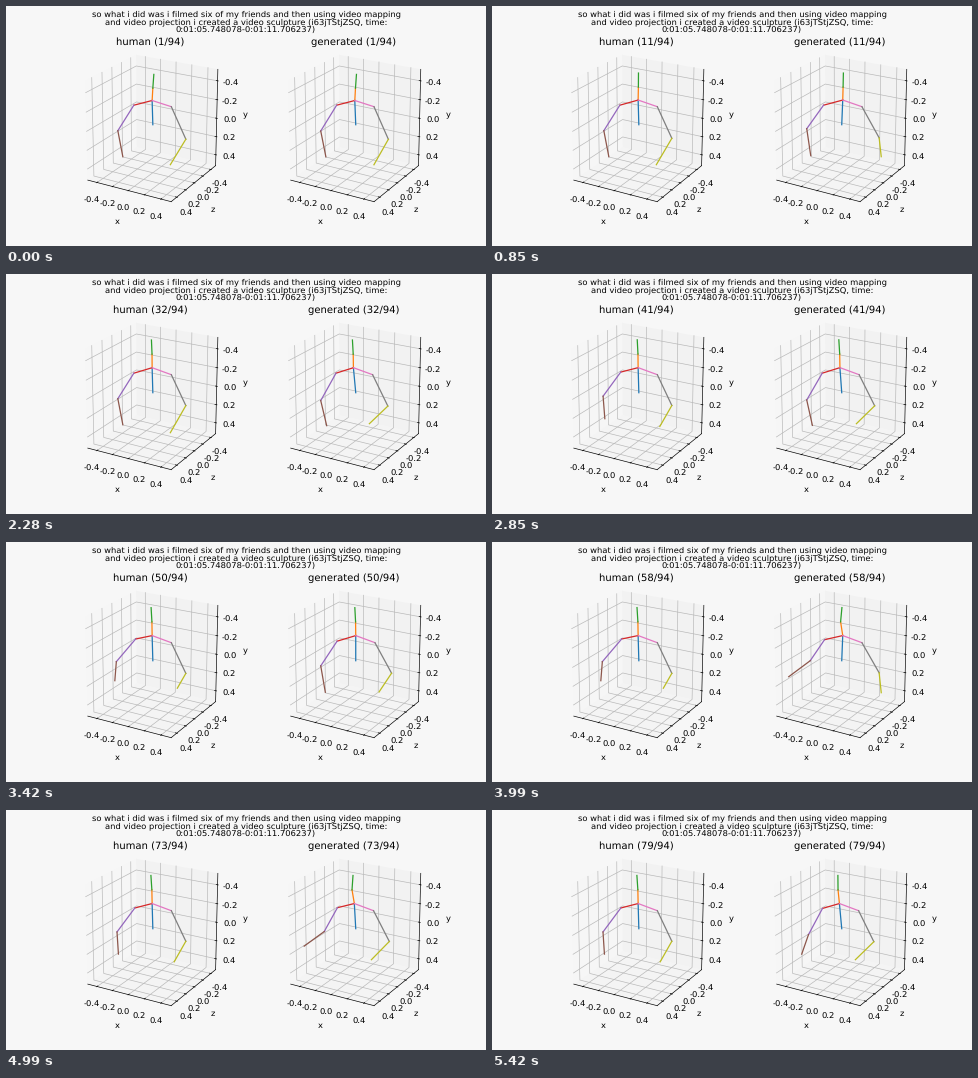
A matplotlib script that plays this animation: 480 px wide and 240 px high, repeating every 5.57 s.

```python
import numpy as np
import matplotlib.pyplot as plt
from matplotlib.animation import FuncAnimation

W, H, DPI = 480, 240, 60
STEPS, LOOP = 39, 5570
SUB = 6  # ticks per step
BACK = "#f7f7f7"

# Two side-by-side plot areas, in pixels from the top left
AX_W = 0.775 / 2.2 * W
AX_H = 0.77 * H
AX_BOTTOM = 0.89 * H
LEFTS = [0.125 * W, 0.125 * W + 1.2 * AX_W]

ELEV, AZIM, DIST = np.radians(20), np.radians(60), 10
EDGE = 0.5 + 1 / 48
TICK_PAD, LABEL_PAD = 0.1083, 0.2355
TICKS = [k / 5 for k in range(-2, 3)]

CAPTION = (
    "so what i did was i filmed six of my friends and then using video mapping\n"
    "and video projection i created a video sculpture (i63jTStjZSQ, time:\n"
    "0:01:05.748078-0:01:11.706237)"
)

# Resting joints, in pixels from the hip
REST = {
    "hip": (0, 0), "neck": (-0.7, -24.2), "chin": (0, -36.5), "head": (1, -50.3),
    "l_shoulder": (-19, -19.5), "l_elbow": (-35, 6), "l_wrist": (-30, 32),
    "r_shoulder": (18.5, -18), "r_elbow": (33, 14.5), "r_wrist": (17.5, 40),
}
CHAINS = [
    ["hip", "neck", "chin", "head"],
    ["neck", "l_shoulder", "l_elbow", "l_wrist"],
    ["neck", "r_shoulder", "r_elbow", "r_wrist"],
]
BONES = [pair for chain in CHAINS for pair in zip(chain, chain[1:])]


def ease(s, a, b):
    u = np.clip((s - a) / (b - a), 0, 1)
    return u * u * (3 - 2 * u)


def bump(s, mid, width):
    return np.exp(-((s - mid) / width) ** 2 / 2)


def grow(s):
    return 1 - np.exp(-s / 10)


def lift(s):
    return ease(s, 16, 24) - 0.45 * ease(s, 28, 35)


def sway(s):
    return np.cos(2 * np.pi * (s - 6) / 22)


def fling(s):
    return ease(s, 24, 28) - ease(s, 35, 41)


def spread(s):
    return bump(s, 6, 2.5) + bump(s, 28, 2.5)


def settle(s):
    return ease(s, 0, 6)


# Each gesture shifts a few joints by its current amount
STRETCH = (grow, {"neck": (0, -1), "chin": (-1, -2.5), "head": (-3, -3),
                  "r_elbow": (0, -2)})
HUMAN = [
    STRETCH,
    (lift, {"l_shoulder": (1.8, -2.2), "l_elbow": (-1.5, -5),
            "l_wrist": (-8, -12), "r_wrist": (7, -12.5)}),
]
GENERATED = [
    STRETCH,
    (sway, {"neck": (1.7, 0), "chin": (1.8, 0), "head": (2, 0),
            "l_shoulder": (0.8, 0), "l_elbow": (0, -2), "l_wrist": (-1, -1),
            "r_shoulder": (1.7, 0), "r_elbow": (2.7, -0.5), "r_wrist": (3, 0)}),
    (fling, {"chin": (-2, 0), "l_shoulder": (1, -1.5), "l_elbow": (3.5, -4),
             "l_wrist": (-22, -15)}),
    (spread, {"r_wrist": (20, 1)}),
    (settle, {"r_elbow": (1.7, 0), "r_wrist": (-1, -9)}),
]


def pose(gestures, hip, s):
    joints = {j: hip + np.array(p) for j, p in REST.items()}
    for amount, shifts in gestures:
        for j, d in shifts.items():
            joints[j] = joints[j] + amount(s) * np.array(d)
    return joints


def project(left, points):
    """Perspective view of box points, in stage pixels."""
    x, y, z = np.asarray(points, float).reshape(-1, 3).T
    right = x * np.sin(AZIM) + y * np.cos(AZIM)
    back = y * np.sin(AZIM) - x * np.cos(AZIM)
    up = back * np.sin(ELEV) + z * np.cos(ELEV)
    depth = DIST + back * np.cos(ELEV) - z * np.sin(ELEV)
    px = left + (right / depth + 0.095) / 0.185 * AX_W
    py = AX_BOTTOM - (up / depth + 0.095) / 0.185 * AX_H
    return px, py


plt.rcParams.update({"font.family": "DejaVu Sans", "text.hinting": "none"})
fig = plt.figure(figsize=(W / DPI, H / DPI), dpi=DPI, facecolor=BACK)
ax = fig.add_axes([0, 0, 1, 1])
ax.set(xlim=(0, W), ylim=(H, 0))
ax.axis("off")


def stroke(left, points, color, z):
    ax.plot(*project(left, points), color=color, lw=0.8, zorder=z)


def label(left, point, text, va):
    (x,), (y,) = project(left, point)
    ax.text(x, y, text, size=10, ha="center", va=va)


def draw_box(left):
    e = EDGE
    panes = [
        ([(-e, -e, -e), (-e, e, -e), (-e, e, e), (-e, -e, e)], 0.963),
        ([(-e, e, -e), (e, e, -e), (e, e, e), (-e, e, e)], 0.95),
        ([(-e, -e, -e), (e, -e, -e), (e, e, -e), (-e, e, -e)], 0.956),
    ]
    for corners, grey in panes:
        ax.fill(*project(left, corners), color=(grey,) * 3, lw=0, zorder=1)

    # Name, label sign, point on the edge, tick direction, grid path
    axes = [
        ("x", 1, lambda v, pad=0: (v, -e - pad, -e - pad), (0, -1, 0),
         lambda v: [(v, -e, -e), (v, e, -e), (v, e, e)]),
        ("z", -1, lambda v, pad=0: (e + pad, v, -e - pad), (1, 0, 0),
         lambda v: [(e, v, -e), (-e, v, -e), (-e, v, e)]),
        ("y", -1, lambda v, pad=0: (e + pad, e + pad, v), (1, 0, 0),
         lambda v: [(-e, -e, v), (-e, e, v), (e, e, v)]),
    ]
    for name, sign, edge, out, grid in axes:
        stroke(left, [edge(-e), edge(e)], "k", 3)
        label(left, edge(0, LABEL_PAD), name, "center")
        for t in TICKS:
            v = sign * t
            stroke(left, grid(v), "#b8b8b8", 2)
            p, d = np.array(edge(v)), np.array(out) / 12
            stroke(left, [p + 0.1 * d, p - 0.2 * d], "k", 3)
            label(left, edge(v, TICK_PAD), f"{t:.1f}", "top")


ax.text(W / 2, 4, CAPTION, size=10, ha="center", va="top", linespacing=1.06)

views = []
for name, gestures, left in zip(("human", "generated"), (HUMAN, GENERATED), LEFTS):
    draw_box(left)
    title = ax.text(left + AX_W / 2, AX_BOTTOM - 0.92 * AX_H - 5, "", size=12,
                    ha="center", va="baseline")
    lines = [ax.plot([], [], color=f"C{k}", lw=1.5, zorder=4)[0]
             for k in range(len(BONES))]
    hip = np.ravel(project(left, (0, 0, 0)))
    views.append((name, gestures, hip, title, lines))


def update(tick):
    # A step begins on the tick just before its exact time
    step = min((tick + 1) // SUB, STEPS - 1)
    count = max(1, int(2.13 * step - 1.1))
    changed = []
    for name, gestures, hip, title, lines in views:
        title.set_text(f"{name} ({count}/94)")
        joints = pose(gestures, hip, step)
        for line, (a, b) in zip(lines, BONES):
            line.set_data(*zip(joints[a], joints[b]))
        changed += [title, *lines]
    return changed


anim = FuncAnimation(fig, update, frames=STEPS * SUB,
                     interval=LOOP / (STEPS * SUB), repeat=True, repeat_delay=0)
plt.show()
```
